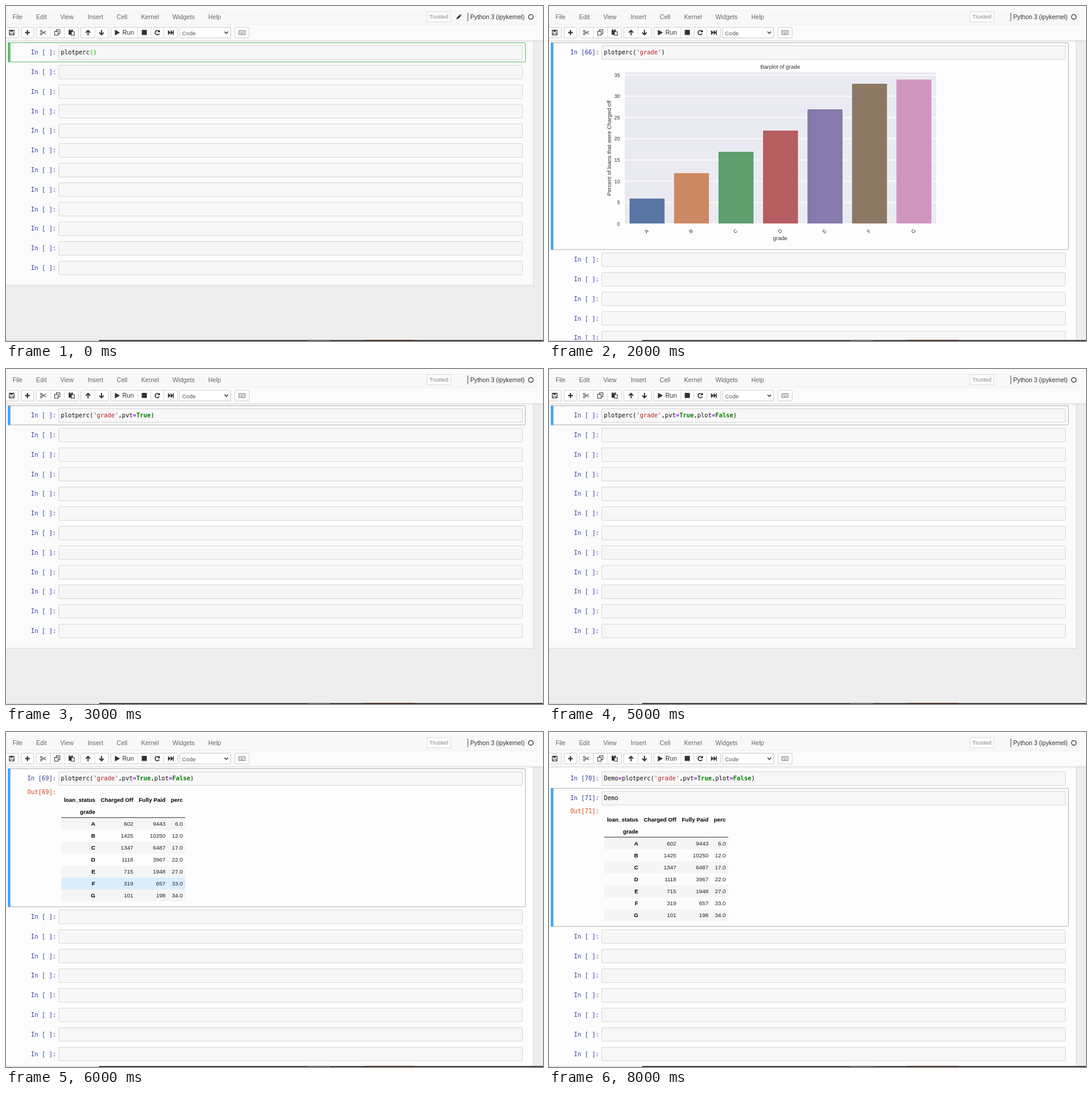
Write an HTML page that moves like this. It is 900 by 561 pixels and loops after 9 s.

```html
<!DOCTYPE html>
<html lang="en">
<head>
<meta charset="utf-8">
<style>
  html, body { margin: 0; width: 100%; height: 100%; overflow: hidden; background: #eee; }
  svg { display: block; width: 900px; height: 561px; font-family: "Liberation Sans", Arial, sans-serif; }
  text { white-space: pre; }
  .mono { font: 10px "DejaVu Sans Mono", monospace; }
  .str { fill: #ba2121; }
  .key { fill: #008000; font-weight: bold; }
  .op { fill: #a2f; font-weight: bold; }
  .match { fill: #0b0; }
</style>
</head>
<body>
<svg viewBox="0 0 900 561"><g id="book"></g><g id="frame"></g></svg>
<script>
const PITCH = 32.8, TOP = 61.3, CHART_H = 314.2, TABLE_H = 199;

const rect = (x, y, w, h, fill, extra = '') =>
  `<rect x="${x}" y="${y}" width="${w}" height="${h}" fill="${fill}" ${extra}/>`;
const text = (x, y, s, size, extra = '') =>
  `<text x="${x}" y="${y}" font-size="${size}" ${extra}>${s}</text>`;
const path = (d, extra = '') => `<path d="${d}" ${extra}/>`;
const line = (d, color, width = 1) => path(d, `fill="none" stroke="${color}" stroke-width="${width}"`);
const END = 'text-anchor="end"', MID = 'text-anchor="middle"', BOLD = 'font-weight="bold"';

// Menu bar, toolbar and the bottom edge of the window
function chrome() {
  let s = rect(0, 0, 900, 58, '#fbfbfb') + rect(0, 6, 889, 24.5, '#f8f8f8') + rect(0, 30.5, 889, 1, '#efefef');
  s += rect(0, 57.5, 900, 1, '#dcdcdc') + rect(0, 58.5, 900, 2, '#000', 'opacity=".04"');
  const menu = { File: 11, Edit: 50.5, View: 91, Insert: 137, Cell: 185.5, Kernel: 226.5, Widgets: 279, Help: 339 };
  for (const name in menu) s += text(menu[name], 21.6, name, 10.3, 'fill="#666"');
  s += rect(705.5, 9.5, 40, 17, '#fcfcfc', 'stroke="#ddd"') + text(709.5, 21.2, 'Trusted', 9.5, 'fill="#888"');
  s += rect(773.5, 11, 1, 14.5, '#444') + text(778, 21.6, 'Python 3 (ipykernel)', 10.25, 'fill="#333"');
  s += '<circle cx="879.6" cy="18.2" r="3.9" fill="none" stroke="#333" stroke-width="1.3"/>';

  const groups = [[-6, 20.5], [25.5, 46.5], [51, 74.5, 98, 121.5], [125.5, 149, 171.5],
    [176, 221, 243, 264.5, 287.5], [383.5, 407.5]];
  for (const g of groups) {
    const x = g[0], end = g[g.length - 1];
    s += rect(x, 35.5, end - x, 18, '#fff', 'rx="1.5" stroke="#d0d0d0"');
    for (const d of g.slice(1, -1)) s += rect(d - .5, 36, 1, 17, '#d8d8d8');
  }
  const ink = '#333';
  // save, add, cut
  s += rect(5.5, 40.5, 8, 8, 'none', `stroke="${ink}" stroke-width="1.1"`) + rect(7, 40.5, 4.5, 2.6, ink) + rect(7.2, 45.5, 4.8, 3, 'none', `stroke="${ink}" stroke-width=".8"`);
  s += line('M32 44.5h8M36 40.5v8', ink, 2.2);
  s += line('M60 42.8l7 4.2M60 46.2l7 -4.2', '#555', 1.2);
  for (const y of [42, 47]) s += `<circle cx="59" cy="${y}" r="1.5" fill="none" stroke="#555" stroke-width="1.1"/>`;
  // copy, paste
  s += rect(84.5, 39.8, 5.8, 6.5, '#fff', `stroke="${ink}" stroke-width="1"`) + rect(81.6, 42.5, 5.8, 6.5, '#fff', `stroke="${ink}" stroke-width="1"`);
  s += rect(105, 39.5, 7, 8.5, ink) + rect(109.5, 43, 5, 6, '#fff', `stroke="${ink}" stroke-width="1"`) + rect(107, 40, 3, 1, '#ddd');
  // move up, move down
  s += line('M137.5 49v-7.5M133.8 44.6l3.7 -3.7l3.7 3.7', ink, 1.9) + line('M160 40v7.5M156.3 44.4l3.7 3.7l3.7 -3.7', ink, 1.9);
  // run, stop, restart, run all
  s += path('M182.5 39.8l8.5 4.7l-8.5 4.7z', `fill="${ink}"`) + text(195, 48, 'Run', 10.5, `fill="${ink}"`);
  s += rect(227.5, 40, 8.5, 8.5, ink);
  s += line('M256.5 42.5A3.6 3.6 0 1 0 256.9 46', ink, 1.7) + path('M258 39.8v4.2h-4.2z', `fill="${ink}"`);
  s += path('M271.5 40.2l4.4 4.3l-4.4 4.3zM275.9 40.2l4.4 4.3l-4.4 4.3z', `fill="${ink}"`) + rect(279.8, 40.3, 1.4, 8.4, ink);
  // cell type, command palette
  s += rect(291, 35.5, 85.5, 18, '#fff', 'rx="1.5" stroke="#ccc"') + text(295, 48.7, 'Code', 9.5, 'fill="#555"');
  s += line('M366.3 43l3 3l3 -3', ink, 1.4);
  s += rect(390.3, 41.2, 10.5, 6.6, '#fff', 'stroke="#666" stroke-width=".9"');
  s += line('M391.8 43.2h7.6M391.8 44.7h7.6', '#888', .9).replace('/>', ' stroke-dasharray="1 .6"/>') + line('M393 46.2h5', '#888', .9);

  s += rect(0, 559.5, 156, 1.5, '#d8d8d8') + rect(156, 559.5, 744, 1.5, '#181818');
  s += rect(505, 559.5, 38, 1.5, '#666') + rect(600, 559.5, 85, 1.5, '#3a2418');
  return s;
}

const COLORS = ['#5875a4', '#cc8963', '#5f9e6e', '#b55d60', '#857aab', '#8d7866', '#d095bf'];
const ROWS = [['A', 602, 9443, 6], ['B', 1425, 10250, 12], ['C', 1347, 6487, 17], ['D', 1118, 3967, 22],
  ['E', 715, 1948, 27], ['F', 319, 657, 33], ['G', 101, 198, 34]];

function chart() {
  const base = 364.7, unit = 7.12, step = 522 / 7, ink = 'fill="#333"';
  let s = rect(127, 111, 522, base - 111, '#eaeaf2');
  for (let v = 0; v <= 35; v += 5) {
    const y = base - v * unit;
    s += rect(127, y - .7, 522, 1.4, '#fff') + text(119, y + 3, v, 8.5, `${END} ${ink}`);
  }
  ROWS.forEach(([name, , , perc], i) => {
    const x = 127 + step * (i + .1), mid = 127 + step * (i + .5), h = perc * unit;
    s += rect(x, base - h, step * .8, h, COLORS[i], 'stroke="#fff" stroke-width=".8"');
    s += text(mid - 1, 380, name, 8.5, `${MID} ${ink} transform="rotate(-45 ${mid - 1} 377)"`);
  });
  s += text(387.5, 105.3, 'Barplot of grade', 9.4, `${MID} ${ink}`);
  s += text(387.5, 392, 'grade', 9.3, `${MID} ${ink}`);
  s += text(0, 0, 'Percent of loans that were Charged off', 9.35, `${MID} ${ink} transform="translate(103.5 238) rotate(-90)"`);
  return s;
}

function table(hover) {
  const right = [149.6, 213.3, 267.2, 296.3];
  let s = '';
  ['loan_status', 'Charged Off', 'Fully Paid', 'perc'].forEach((h, i) => s += text(right[i], 116.8, h, 9.45, `${END} ${BOLD}`));
  s += text(right[0], 136.8, 'grade', 9.45, `${END} ${BOLD}`);
  ROWS.forEach((row, r) => {
    const y = 143.8 + r * 20;
    const fill = row[0] === hover ? '#daedfc' : r % 2 ? 'none' : '#f5f5f5';
    s += rect(92.5, y, 208, 20, fill);
    row.forEach((v, i) => s += text(right[i], y + 13.5, i === 3 ? v.toFixed(1) : v, 9.45, i ? `${END} fill="#222"` : `${END} ${BOLD}`));
  });
  return s + rect(92.5, 142.8, 208, 1, '#333');
}

const highlight = (code, edit) => edit
  ? code.replace(/[()]/g, '<tspan class="match">$&</tspan>')
  : code.replace(/'[^']*'|True|False|=/g, m =>
      `<tspan class="${m === '=' ? 'op' : m[0] === "'" ? 'str' : 'key'}">${m}</tspan>`);

const prompt = (y, s, color) => `<text class="mono" x="84" y="${y}" text-anchor="end" fill="${color}">${s}</text>`;

function cell(top, c, selected, edit) {
  const height = PITCH + (c.chart ? CHART_H : 0) + (c.table ? TABLE_H : 0);
  let s = '';
  if (selected) {
    s += rect(3.5, top + .2, 867, height - .6, 'none', `rx="1.5" stroke="${edit ? '#66bb6a' : '#b4b4b4'}"`);
    s += rect(3, top - .2, 4.4, height + .2, edit ? '#66bb6a' : '#42a5f5');
  }
  s += rect(88.5, top + 5.2, 777, 22.8, '#f7f7f7', 'rx="1.5" stroke="#d5d5d5"');
  s += prompt(top + 19.8, `In [${c.n || ' '}]:`, '#303f9f');
  s += `<text class="mono" x="92" y="${top + 19.8}" fill="#111">${highlight(c.code || '', edit)}</text>`;
  if (c.chart) s += `<g transform="translate(0 ${top - TOP})">${chart()}</g>`;
  if (c.table) {
    const shift = top - TOP + (c.chart ? CHART_H : 0);
    s += prompt(TOP + 42.3 + shift, `Out[${c.n}]:`, '#d84315');
    s += `<g transform="translate(0 ${shift})">${table(c.hover)}</g>`;
  }
  return [s, height];
}

function notebook({ cells, selected = 0, edit }) {
  let y = TOP, s = '';
  for (let i = 0; i < 12; i++) {
    const [part, height] = cell(y, cells[i] || {}, i === selected, edit);
    s += part;
    y += height;
  }
  const bottom = y + 12, paper = bottom > 561 ? '#fdfdfd' : '#fbfbfb';
  const pen = edit ? path('M755 22.2l.7 -2.8l4.8 -4.8l2.1 2.1l-4.8 4.8zM761.2 13.9l.8 -.7l2 2l-.7 .8z', 'fill="#333"') : '';
  return [rect(0, 58, 885, bottom - 56, '#e5e5e5') + rect(0, 58, 883, bottom - 58, paper) + s, pen];
}

const byGrade = "plotperc('grade')", pivot = "plotperc('grade',pvt=True)",
  noPlot = "plotperc('grade',pvt=True,plot=False)", assign = 'Demo=' + noPlot;
const scenes = [
  { cells: [{ code: 'plotperc()' }], edit: true },
  { cells: [{ code: byGrade }] },
  { cells: [{ code: byGrade, n: 66, chart: true }] },
  { cells: [{ code: pivot }] },
  { cells: [{ code: pivot, n: 68, chart: true, table: true }] },
  { cells: [{ code: noPlot }] },
  { cells: [{ code: noPlot, n: 69, table: true, hover: 'F' }] },
  { cells: [{ code: assign }, { code: 'Demo' }] },
  { cells: [{ code: assign, n: 70 }, { code: 'Demo', n: 71, table: true }], selected: 1 },
].map(notebook);

const book = document.getElementById('book'), frame = document.getElementById('frame');
const bars = chrome(), start = performance.now();
let shown = -1;
function tick() {
  const i = Math.floor((performance.now() - start) / 1000) % scenes.length;
  if (i !== shown) {
    shown = i;
    book.innerHTML = scenes[i][0];
    frame.innerHTML = bars + scenes[i][1];
  }
  requestAnimationFrame(tick);
}
tick();
</script>
</body>
</html>
```
